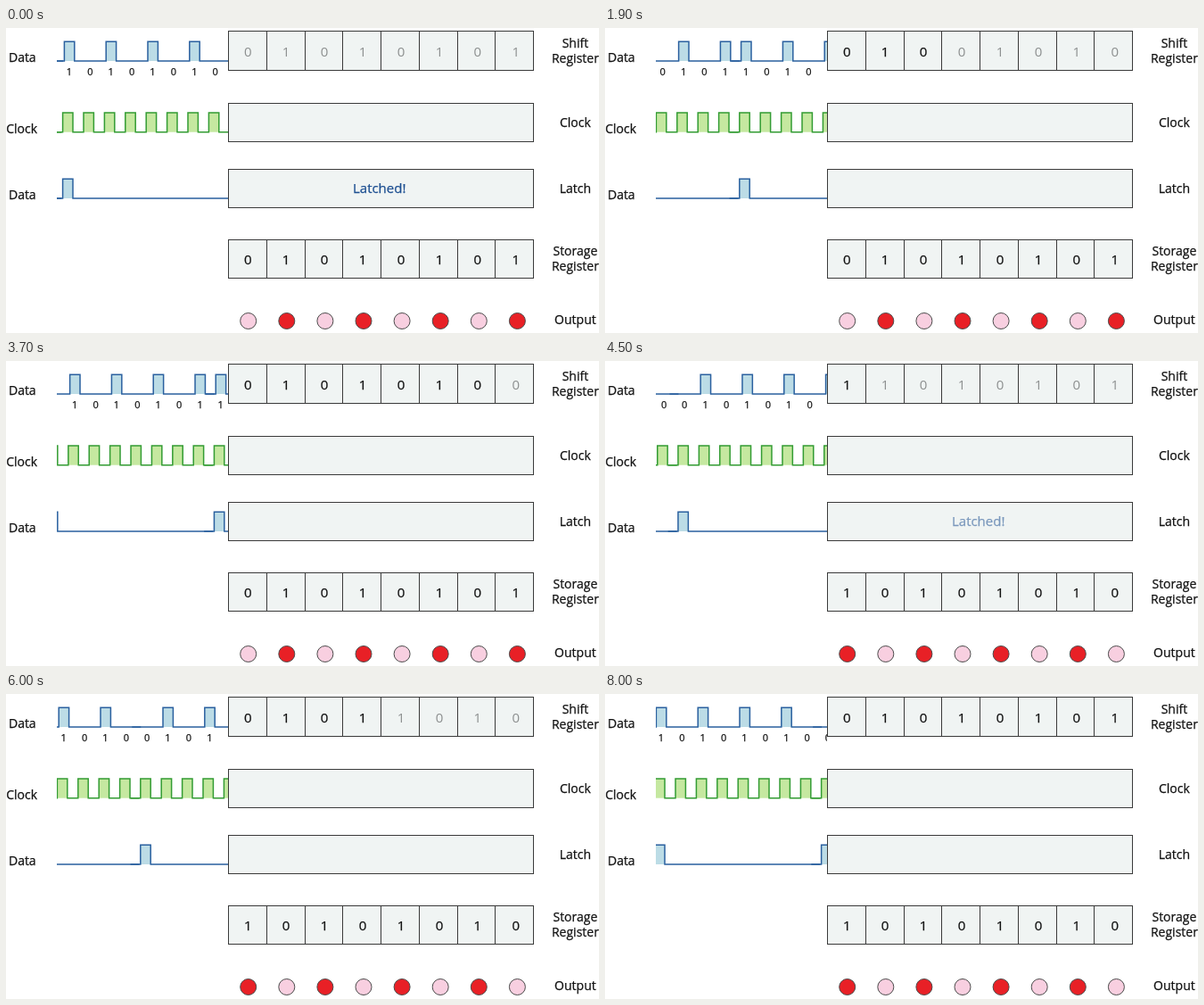
An HTML page that plays this animation: 665x342 px, repeating every 8.1 s.

```html
<!DOCTYPE html>
<html lang="en">
<head>
<meta charset="utf-8">
<title>Shift register</title>
<style>
html, body { margin: 0; width: 100%; height: 100%; overflow: hidden; background: #fff; }
svg { display: block; width: 665px; height: 342px; }
text {
  font: 14px "Open Sans", "Noto Sans", sans-serif; text-anchor: middle;
  fill: #111; stroke: #111; stroke-width: 0.25px;
}
.digit { font-size: 15px; }
.bit { font-size: 11px; }
.old { fill: #8c8f8f; stroke: none; }
.latched { font-size: 15px; fill: #1d4f91; stroke: #1d4f91; }
.box { fill: #f0f4f3; stroke: #3a3a3a; }
.line { fill: none; stroke-width: 1.5; }
.blue .line { stroke: #2a609f; }
.blue .pulse { fill: #bcdce6; }
.green .line { stroke: #339c33; }
.green .pulse { fill: #c5e8a0; }
.led { fill: #f8cfe0; stroke: #4a4a4a; }
.led.on { fill: #e82026; }
</style>
</head>
<body>
<svg viewBox="0 0 665 342">
  <defs><clipPath id="window"><rect x="57" y="0" width="192" height="210"/></clipPath></defs>
  <g id="waves" clip-path="url(#window)"></g>
  <g id="panel"></g>
</svg>
<script>
const STEP = 100, LOOP = 8100, SPLIT = 41;
const PITCH = 23.4, TILE = 187, SPEED = 4.59, START = 69.3, CELL = 42.75;
const WORDS = ["10101010", "01010101"];
const waves = document.getElementById("waves");
const panel = document.getElementById("panel");

function add(parent, tag, attrs, content) {
  const el = document.createElementNS("http://www.w3.org/2000/svg", tag);
  for (const key in attrs) el.setAttribute(key, attrs[key]);
  if (content !== undefined) el.textContent = content;
  parent.appendChild(el);
  return el;
}

function label(x, y, content, cls = "") {
  return add(panel, "text", { x, y, class: cls }, content);
}

function wave(parent, cls, bits, x0, base, top) {
  const g = add(parent, "g", { class: cls });
  let path = `M${x0 - 17} ${base}`;
  [...bits].forEach((bit, i) => {
    if (bit === "0") return;
    const left = x0 + i * PITCH - 5.7, right = left + 11.4;
    add(g, "rect", { class: "pulse", x: left, y: top, width: 11.4, height: base - top });
    path += `H${left}V${top}H${right}V${base}`;
  });
  add(g, "path", { class: "line", d: path + `H${x0 + 180}` });
}

const tiles = WORDS.map(word => {
  const g = add(waves, "g", {});
  wave(g, "blue", word, START + 1.8, 37, 15.3);
  wave(g, "green", "11111111", START, 116.7, 95);
  wave(g, "blue", "10000000", START, 191, 169.2);
  [...word].forEach((bit, i) =>
    add(g, "text", { class: "bit", x: START + 1.6 + i * PITCH, y: 52.8 }, bit));
  return g;
});

function box(y, height) {
  add(panel, "rect", { class: "box", x: 249.5, y, width: 342, height });
}

function digitRow(y, height, baseline) {
  box(y, height);
  return cells.map(i => {
    const x = 249 + i * CELL;
    if (i) add(panel, "path", { class: "box", d: `M${Math.round(x) + 0.5} ${y}v${height}` });
    return label(271.2 + i * 42.95, baseline, "0", "digit");
  });
}

const cells = [...Array(8).keys()];
const shiftRow = digitRow(3.5, 44, 32);
box(84.5, 43);
box(158.5, 43);
const storeRow = digitRow(237.5, 43, 265.2);
const leds = cells.map(i =>
  add(panel, "circle", { class: "led", cx: 271.7 + i * 43.1, cy: 328.5, r: 9 }));
const latched = label(418.7, 185, "Latched!", "latched");

[
  [18.3, 38, "Data"], [17.6, 118, "Clock"], [18.3, 192, "Data"],
  [638.4, 22, "Shift"], [638.4, 39, "Register"], [638.4, 110.5, "Clock"], [638.4, 185, "Latch"],
  [638.4, 255, "Storage"], [638.4, 272, "Register"], [638.4, 332, "Output"]
].forEach(item => label(...item));

function draw(now) {
  const n = Math.floor((now % LOOP) / STEP);
  const half = n < SPLIT ? 0 : 1;
  const k = n - half * SPLIT;
  const shift = k * SPEED;
  const next = WORDS[half], prev = WORDS[1 - half];

  tiles[half].setAttribute("transform", `translate(${shift})`);
  tiles[1 - half].setAttribute("transform", `translate(${shift - TILE})`);

  const count = Math.floor((n - half * 40) / 5);
  cells.forEach(i => {
    const fresh = i < count;
    shiftRow[i].textContent = fresh ? next[8 - count + i] : prev[i - count];
    shiftRow[i].classList.toggle("old", !fresh);
    storeRow[i].textContent = prev[i];
    leds[i].classList.toggle("on", prev[i] === "1");
  });
  latched.setAttribute("opacity", Math.max(0, 1 - k / 9));
}

function tick() {
  draw(performance.now());
  requestAnimationFrame(tick);
}
tick();
</script>
</body>
</html>
```
